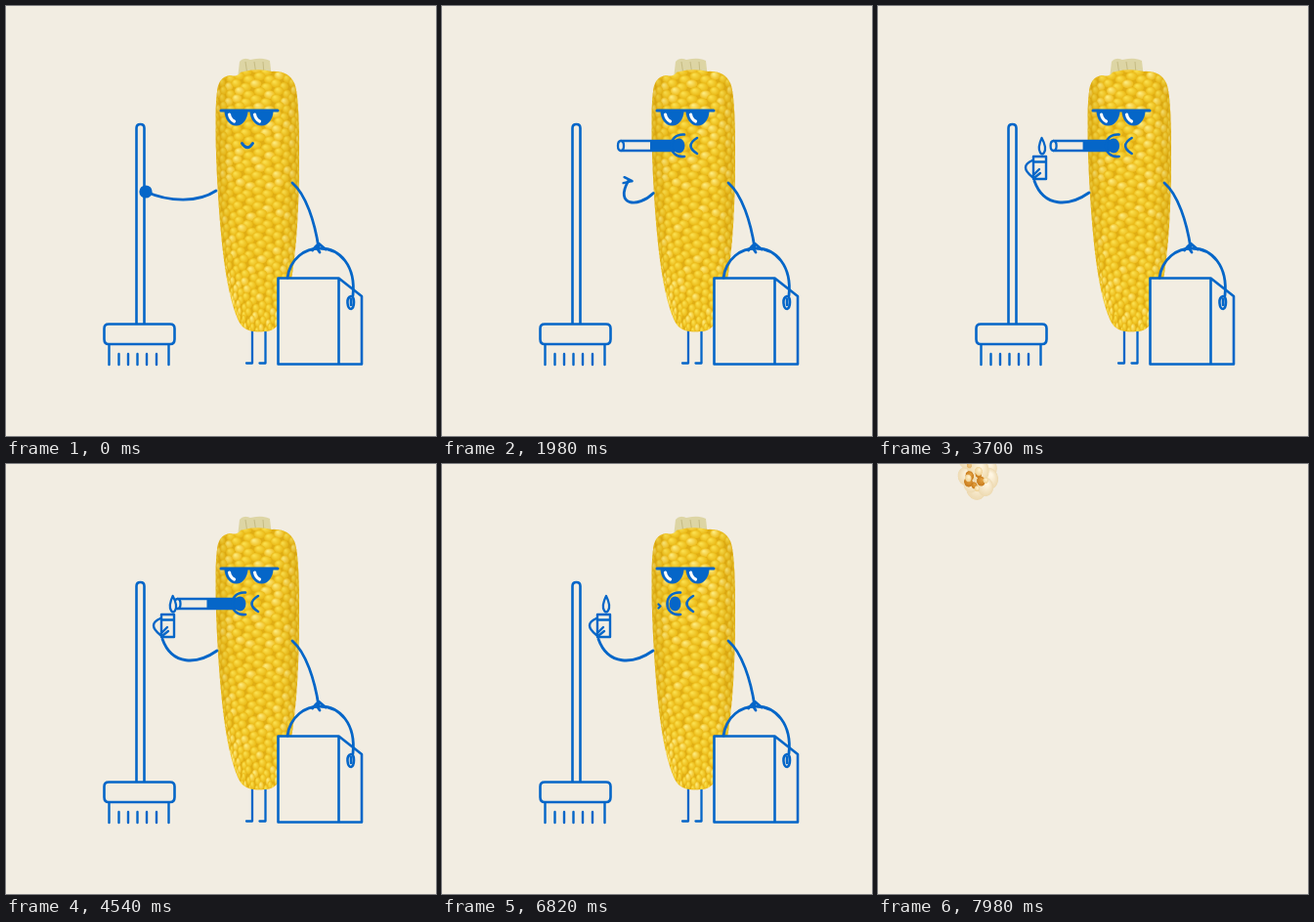
Recreate the animation shown at these times as an HTML page with a canvas. Size 440 by 440 pixels, loop 8 s.

```html
<!DOCTYPE html>
<html lang="en">
<head>
<meta charset="utf-8">
<title>Popcorn</title>
<style>
  html, body { margin: 0; width: 100%; height: 100%; overflow: hidden; background: #f2ede2; }
  canvas { display: block; width: 440px; height: 440px; }
</style>
</head>
<body>
<canvas id="stage" width="440" height="440"></canvas>
<script>
const LOOP = 8000, BG = '#f2ede2', BLUE = '#0566c8';
const BURST = 7140, EMPTY = 7460, DROP = 7980;
const ctx = document.getElementById('stage').getContext('2d');

const clamp = (v, a = 0, b = 1) => Math.min(b, Math.max(a, v));
const mix = (a, b, k) => a.map((v, i) => v + (b[i] - v) * k);
// Progress that moves in n hard steps, the first one at time a
const steps = (t, a, n, dt = 80) => clamp(Math.floor((t - a) / dt) + 1, 0, n) / n;

function track(k, ...stops) {
  for (let i = 1; i < stops.length; i++) {
    const [k0, a] = stops[i - 1], [k1, b] = stops[i];
    if (k <= k1) return mix(a, b, (k - k0) / (k1 - k0));
  }
  return stops[stops.length - 1][1];
}

function random(seed) {
  return () => {
    seed = (seed + 0x6D2B79F5) | 0;
    let r = Math.imul(seed ^ (seed >>> 15), 1 | seed);
    r = (r + Math.imul(r ^ (r >>> 7), 61 | r)) ^ r;
    return ((r ^ (r >>> 14)) >>> 0) / 4294967296;
  };
}

function sprite(w, h, scale, paint) {
  const c = document.createElement('canvas');
  c.width = w * scale;
  c.height = h * scale;
  const g = c.getContext('2d');
  g.scale(scale, scale);
  paint(g);
  return c;
}

function ball(g, x, y, rx, ry, light, dark) {
  g.save();
  g.translate(x, y);
  g.scale(rx, ry);
  const fill = g.createRadialGradient(-.3, -.35, .1, 0, 0, 1);
  fill.addColorStop(0, light);
  fill.addColorStop(1, dark);
  g.fillStyle = fill;
  g.beginPath();
  g.arc(0, 0, 1, 0, 7);
  g.fill();
  g.restore();
}

// --- Corn cob ---
const cob = sprite(440, 440, 2, g => {
  const rnd = random(5);
  g.fillStyle = '#ddd5a4';
  g.fill(new Path2D('M237 74 L239 57 Q243 52 250 55 Q262 52 270 56 L272 74Z'));
  g.strokeStyle = '#c6bc84';
  g.stroke(new Path2D('M245 57 L247 70 M254 57 L256 70 M263 57 L264 70'));

  g.clip(new Path2D('M216 88 Q217 73 229 71 Q237 73 240 68 Q256 63 272 67 Q289 66 295 79' +
    ' Q300 90 300 150 C300 210 297 262 288 300 C283 322 278 333 264 333' +
    ' Q245 335 239 324 C224 294 219 230 216 175 Q213 110 216 88Z'));
  g.fillStyle = '#e0ad14';
  g.fillRect(200, 50, 120, 300);
  for (let row = 0; row < 36; row++) {
    for (let col = -6; col <= 6; col++) {
      const a = col * .245 + (row % 2 ? .04 : -.04);
      const y = 64 + row * 7.8 + (col & 1 ? 3.6 : 0) - Math.abs(col) * .3;
      const r = clamp((y - 150) / 195);
      const w = 43 * Math.sqrt(1 - Math.pow(r, 2.6));
      const x = 257.5 + r * 5 + Math.sin(a) * w + (rnd() - .5) * 1.2;
      const rx = Math.max(1.6, 6 * Math.cos(a) * w / 43);
      const tone = rnd() < .25;
      ball(g, x, y, rx, 4.5, tone ? '#fdec80' : '#fbe04f', tone ? '#efbd1e' : '#eab815');
    }
  }
  const shade = g.createLinearGradient(214, 0, 301, 0);
  shade.addColorStop(0, 'rgba(190,140,10,.35)');
  shade.addColorStop(.22, 'rgba(190,140,10,0)');
  shade.addColorStop(.75, 'rgba(190,140,10,0)');
  shade.addColorStop(1, 'rgba(180,130,10,.3)');
  g.fillStyle = shade;
  g.fillRect(200, 50, 120, 300);
});

// --- Popcorn: hull, cluster, chunk ---
const flakes = ['hull', 'cluster', 'chunk'].map((kind, n) => sprite(64, 64, 2, g => {
  const rnd = random(21 + n * 9);
  g.translate(32, 32);
  const lobes = (count, cx, cy, sx, sy, r, light, dark) => {
    for (let i = 0; i < count; i++) {
      const a = i / count * 6.283 + rnd() * .5, size = r * (.75 + rnd() * .5);
      ball(g, cx + Math.cos(a) * sx, cy + Math.sin(a) * sy, size, size * .85, light, dark);
    }
  };
  if (kind === 'hull') {
    ball(g, 7, 0, 17, 20, '#ddd7cd', '#bdb5a9');
    lobes(6, -10, 1, 6, 12, 7, '#fbf3e4', '#e3cda8');
    lobes(5, -10, -1, 4, 8, 4.5, '#e9a55c', '#cf7d30');
    lobes(3, -8, 2, 5, 9, 3.2, '#fff5e2', '#ecc897');
  } else if (kind === 'cluster') {
    lobes(9, 0, 0, 18, 12, 10, '#fff6e3', '#edd9b0');
    ball(g, -2, -2, 14, 11, '#fff4dc', '#eed8aa');
    lobes(5, 7, 4, 6, 7, 4.2, '#e2a040', '#c87a1b');
    lobes(4, 8, 2, 9, 9, 3.6, '#fff1d0', '#efcf8e');
    lobes(3, -12, 5, 4, 3, 2.4, '#f1cd8d', '#e5b163');
  } else {
    lobes(4, 7, -9, 9, 7, 8, '#fbf1e0', '#e6d2b2');
    lobes(5, -4, 8, 12, 8, 9, '#fdf4e5', '#e4cfae');
    ball(g, 1, 1, 12, 14, '#fcf2e1', '#ead8ba');
    lobes(4, 4, 0, 9, 11, 3.4, '#f1c28a', '#e5ab6b');
    lobes(3, -2, 2, 7, 8, 4, '#fff7ea', '#ecd9ba');
  }
}));

// kind, x, y, turn in degrees at the height of the burst
const pieces = [
  [2, 262, 22, 0], [2, 250, 60, 15], [0, 178, 26, 35], [0, 375, 65, -30],
  [1, 252, 96, 0], [0, 299, 105, 60], [1, 215, 128, -5], [2, 141, 141, 10],
  [1, 335, 143, 20], [1, 280, 165, -20], [2, 275, 140, 50], [2, 220, 158, 90],
  [0, 183, 204, -35], [2, 320, 188, 0], [1, 270, 215, 180], [0, 228, 220, 60],
  [1, 242, 195, 10], [0, 320, 222, 200], [2, 205, 250, 20], [1, 303, 285, 30],
  [0, 283, 245, 180], [0, 318, 265, 200], [1, 245, 280, -10], [1, 158, 292, 25],
  [2, 253, 347, -70], [0, 306, 340, 210]
];

function flake(kind, x, y, deg) {
  ctx.save();
  ctx.translate(x, y);
  ctx.rotate(deg * Math.PI / 180);
  ctx.drawImage(flakes[kind], -32, -32, 64, 64);
  ctx.restore();
}

// --- Line drawing ---
function line(d, width = 3, fill) {
  const p = new Path2D(d);
  if (fill) {
    ctx.fillStyle = fill;
    ctx.fill(p);
  }
  ctx.lineWidth = width;
  ctx.stroke(p);
}

function placed(x, y, deg, paint, ox = 0, oy = 0) {
  ctx.save();
  ctx.translate(x, y);
  ctx.rotate(deg * Math.PI / 180);
  ctx.translate(-ox, -oy);
  paint();
  ctx.restore();
}

function broom() {
  line('M133.5 325 V125 Q133.5 121 137.5 121 Q141.5 121 141.5 125 V325', 2.6, BG);
  line('M105 325.5 H168 Q172.5 325.5 172.5 330 V341 Q172.5 346 168 346 H105' +
    ' Q100.5 346 100.5 341 V330 Q100.5 325.5 105 325.5Z', 2.6, BG);
  line('M105.500 347 V367 M166.500 347 V367', 2.4);
  for (const x of [115.5, 125, 134.5, 144, 154]) line(`M${x} 356 V367`, 2.4);
}

function bag() {
  line('M278.500 278.500 H340.500 L364 297 V366.500 H278.500Z M340.500 278.500 V366.500', 2.6, BG);
  line('M288 278 C291 258 306 248 321 248 C342 248 358 266 355 296', 2.8);
  line('M353 297 Q349 298 349.500 304 Q350 310 353 310 Q356 309 356 303 Q356 297 353 297 M353 300 V306', 2.6);
}

function glasses() {
  for (const x of [235.5, 261.5]) {
    ctx.fillStyle = BLUE;
    ctx.fill(new Path2D(`M${x - 12} 107 A12 15.500 0 0 0 ${x + 12} 107Z`));
    ctx.save();
    ctx.strokeStyle = '#fff';
    line(`M${x - 7} 111 Q${x - 6} 116 ${x - 2} 118`, 3.2);
    ctx.restore();
  }
  line('M220 107 H278', 3);
}

function cigar(x, y, deg) {
  placed(x, y, deg, () => {
    line('M-30 -5 H31 V5 H-30Z', 2.5, BG);
    ctx.fillStyle = BLUE;
    ctx.fillRect(0, -6, 32, 12);
    line('M-30 -5 Q-27 -5 -27 0 Q-27 5 -30 5 Q-33 5 -33 0 Q-33 -5 -30 -5Z', 2.3, BG);
  });
}

function lighter(x, y, deg) {
  placed(x, y, deg, () => line('M-6.500 -11.500 H6.500 V11.500 H-6.500Z M-6.500 -6 H6.500', 2.4, BG));
}

function flame(x, y, sway) {
  line(`M${x + sway} ${y - 9} Q${x + 5} ${y + 1} ${x + 2} ${y + 6}` +
    ` Q${x} ${y + 9} ${x - 2} ${y + 6} Q${x - 5} ${y + 1} ${x + sway} ${y - 9}Z`, 2.3, BG);
}

// shoulder, two bend points, hand
const GRIP = [215, 189, 197, 201, 168, 201, 143, 190];
const OUT = [216, 194, 201, 212, 185, 221, 163, 219];
const OFFER = [217, 194, 204, 216, 187, 228, 167, 229];
const DOWN = [217, 195, 212, 210, 207, 235, 207, 252];
const MOUTH = [216, 190, 196, 206, 164, 192, 184, 150];
const LIGHT = [216, 191, 196, 205, 170, 207, 160, 179];

function armAt(t) {
  if (t < 900) return track(steps(t, 340, 4), [0, GRIP], [.5, OUT], [1, DOWN]);
  if (t < 1900) return track(steps(t, 900, 7), [0, DOWN], [3 / 7, OUT], [1, MOUTH]);
  if (t < 2780) return track(steps(t, 1900, 7), [0, MOUTH], [1, DOWN]);
  return track(steps(t, 2780, 6), [0, DOWN], [.5, OFFER], [1, LIGHT]);
}

function arm(t) {
  const [sx, sy, ax, ay, bx, by, x, y] = armAt(t);
  line(`M${sx} ${sy} C${ax} ${ay} ${bx} ${by} ${x} ${y}`, 2.8);
  if (t < 340) {
    ctx.fillStyle = BLUE;
    ctx.beginPath();
    ctx.arc(x, y, 6.6, 0, 7);
    ctx.fill();
  } else if (t >= 3180) {
    line('M158 158 Q144 164 158 175 M159 173 L165 167 M161 175 L166 171', 2.4);
  } else {
    line(`M${x + 4} ${y} L${x - 4} ${y - 4} M${x + 4} ${y} L${x - 5} ${y + 2}`, 2.4);
  }
}

function lips(dx) {
  line(`M${248 + dx} 131.500 C${230 + dx} 130 ${230 + dx} 156 ${248 + dx} 154`, 2.6);
  ctx.fillStyle = BLUE;
  ctx.beginPath();
  ctx.ellipse(242.5 + dx, 143, 6, 7.5, 0, 0, 7);
  ctx.fill();
  line(`M${261 + dx} 135 Q${248 + dx} 143 ${261 + dx} 151`, 2.6);
}

function face(t) {
  glasses();
  if (t < 1380) {
    line('M241.500 140.500 Q247 149 252.500 140.500', 3);
    return;
  }
  const push = steps(t, 3380, 11);
  const pull = Math.pow(steps(t, 5100, 42, 40), 2);
  const dx = -3 * push - pull;
  if (t < 6780) {
    ctx.save();
    ctx.beginPath();
    ctx.rect(0, 0, 244 + dx, 440);
    ctx.clip();
    cigar(213 - 7.5 * push + 66 * pull, 143, 0);
    ctx.restore();
  } else {
    line('M221.500 143.500 L223.500 145.500 L221.500 147.500', 2.2);
  }
  lips(dx);
}

function props(t) {
  if (t >= 900 && t < 1380) {
    const k = steps(t, 900, 7);
    cigar(...track(k, [0, [196, 238, -150]], [3 / 7, [155.5, 205, -100]], [1, [213, 143, 0]]));
  }
  if (t >= 2780) {
    const k = steps(t, 2780, 6);
    lighter(...track(k, [0, [200, 248, -60]], [.5, [165.5, 230.5, -10]], [1, [165.5, 165.5, 0]]));
  }
  if (t >= 3540) {
    const tick = Math.floor(t / 40);
    const drawn = t >= 4260 && t < 6780 ? 3 : 0;
    flame(168 + drawn, 144, Math.sin(tick * 1.7) * .7);
  }
}

function scene(t) {
  line('M252 325 V365.500 H246 M265.500 325 V365.500 H259.500', 2.3);
  ctx.drawImage(cob, 0, 0, 440, 440);
  broom();
  bag();
  line('M293 181 C307 193 316 221 320 248 M313.500 250 L320 243 L327 249 M317 246 L321 252', 2.8);
  face(t);
  props(t);
  arm(t);
}

function burst(t) {
  const u = (BURST + Math.floor((t - BURST) / 80) * 80 - 7100) / 120;
  placed(137 - 103 * u, 245 + 8 * u, -41.5 * u, broom, 137, 245);
  placed(320 + 63.5 * u, 322, 64.5 * u, bag, 320, 322);
  const far = 220 * Math.max(0, u - 1);
  for (const [kind, x, y, deg] of pieces) {
    const dx = x - 258, dy = y - 195, len = Math.hypot(dx, dy) || 1;
    flake(kind,
      258 + dx * (.35 + .65 * u) + dx / len * far,
      195 + dy * (.6 + .4 * u) + dy / len * far,
      deg + (u - 1) * 40 * Math.sign(dx));
  }
}

function draw(t) {
  ctx.fillStyle = BG;
  ctx.fillRect(0, 0, 440, 440);
  ctx.strokeStyle = BLUE;
  ctx.lineCap = ctx.lineJoin = 'round';
  if (t < BURST) scene(t);
  else if (t < EMPTY) burst(t);
  else if (t >= DROP) flake(1, 101, 8, 75);
}

const start = performance.now();
function tick() {
  draw((performance.now() - start) % LOOP);
  requestAnimationFrame(tick);
}
tick();
</script>
</body>
</html>
```
